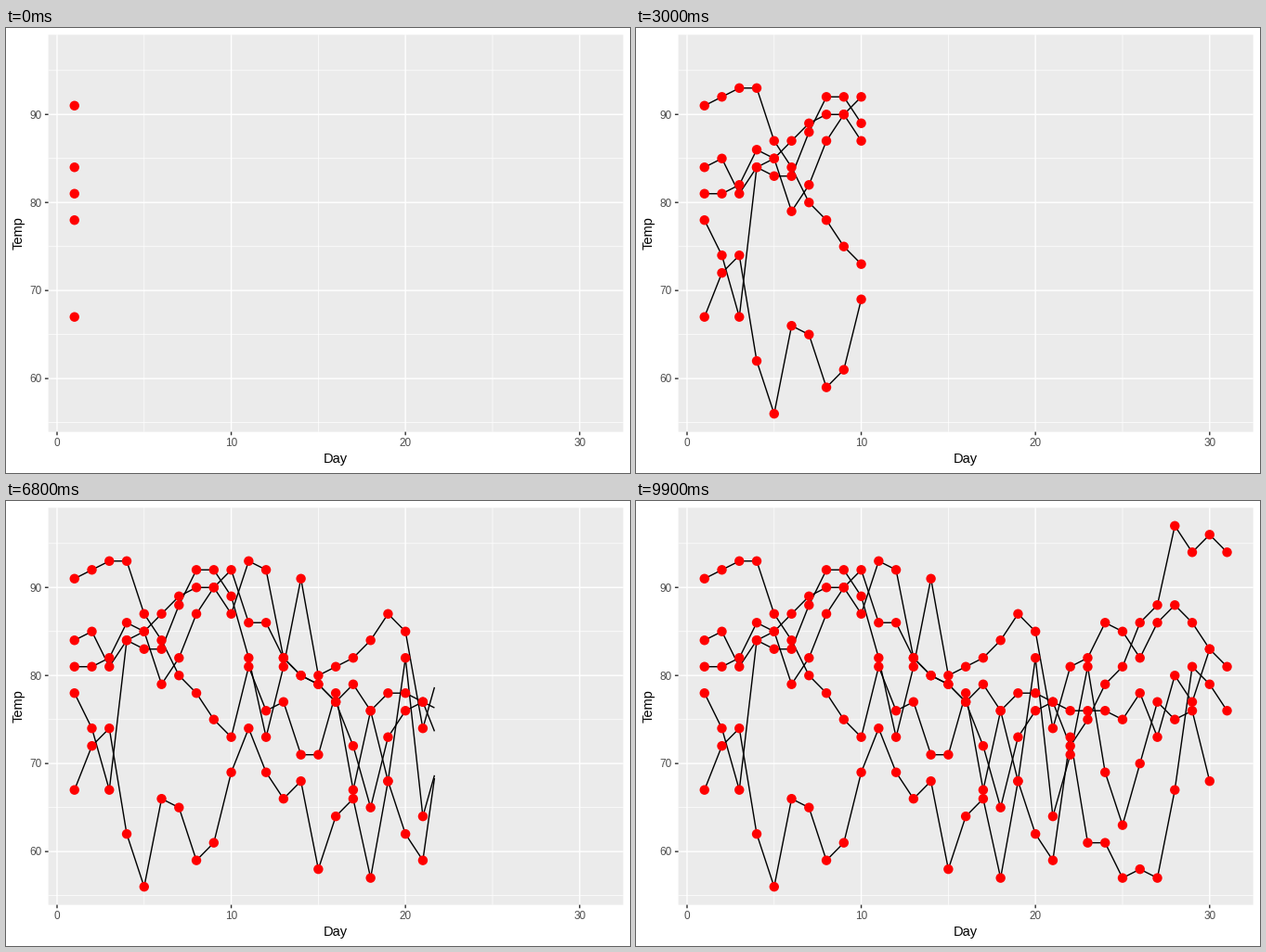
A matplotlib script that plays this animation: 672x480 px, repeating every 10 s.

```python
import matplotlib.pyplot as plt
import numpy as np
from matplotlib.animation import FuncAnimation
from matplotlib.patches import Rectangle

W, H, DPI = 672, 480, 96
FRAMES = 100
PT = 72 / DPI  # points per pixel
LEFT, RIGHT, TOP, BOTTOM = 45.6, 664.67, 7.33, 435.6
TICK = 3.67
THICK, THIN = 1.42, 0.71
DOT = 10.4

plt.rcParams["path.snap"] = False
plt.rcParams["font.family"] = "Liberation Sans"

# Daily temperatures of the airquality data set
may = [67, 72, 74, 62, 56, 66, 65, 59, 61, 69, 74, 69, 66, 68, 58, 64,
       66, 57, 68, 62, 59, 73, 61, 61, 57, 58, 57, 67, 81, 79, 76]
june = [78, 74, 67, 84, 85, 79, 82, 87, 90, 87, 93, 92, 82, 80, 79, 77,
        72, 65, 73, 76, 77, 76, 76, 76, 75, 78, 73, 80, 77, 83]
july = [84, 85, 81, 84, 83, 83, 88, 92, 92, 89, 82, 73, 81, 91, 80, 81,
        82, 84, 87, 85, 74, 81, 82, 86, 85, 82, 86, 88, 86, 83, 81]
august = [81, 81, 82, 86, 85, 87, 89, 90, 90, 92, 86, 86, 82, 80, 79, 77,
          79, 76, 78, 78, 77, 72, 75, 79, 81, 86, 88, 97, 94, 96, 94]
september = [91, 92, 93, 93, 87, 84, 80, 78, 75, 73, 81, 76, 77, 71, 71, 78,
             67, 76, 68, 82, 64, 71, 81, 69, 63, 70, 77, 75, 76, 68]
months = [np.array(m) for m in (may, june, july, august, september)]

days = np.arange(1, 32)
key_frames = np.round((days - 1) * (FRAMES - 1) / 30)


def px(day):
    return LEFT + (day + 0.5) * (RIGHT - LEFT) / 33


def py(temp):
    return BOTTOM - (temp - 53.95) * (BOTTOM - TOP) / 45.1


fig = plt.figure(figsize=(W / DPI, H / DPI), dpi=DPI, facecolor="white")
ax = fig.add_axes([0, 0, 1, 1])
ax.axis("off")


def segment(xs, ys, color, width, z):
    ax.plot(xs, ys, color=color, lw=width * PT, solid_capstyle="butt", zorder=z)


def label(x, y, text, size=8.8, color="#4d4d4d", **kw):
    ax.text(x, y, text, size=size, color=color, va="baseline", **kw)


ax.add_patch(Rectangle((LEFT, TOP), RIGHT - LEFT, BOTTOM - TOP,
                       fc="#ebebeb", lw=0, zorder=0))

for day in (5, 15, 25):
    segment([px(day)] * 2, [TOP, BOTTOM], "white", THIN, 1)
for temp in range(55, 100, 10):
    segment([LEFT, RIGHT], [py(temp)] * 2, "white", THIN, 1)

for day in (0, 10, 20, 30):
    x = px(day)
    segment([x, x], [TOP, BOTTOM], "white", THICK, 2)
    segment([x, x], [BOTTOM, BOTTOM + TICK], "#333333", THICK, 2)
    label(x, 451, str(day), ha="center")
for temp in (60, 70, 80, 90):
    y = py(temp)
    segment([LEFT, RIGHT], [y, y], "white", THICK, 2)
    segment([LEFT - TICK, LEFT], [y, y], "#333333", THICK, 2)
    label(39, y + 4.3, str(temp), ha="right")

label((LEFT + RIGHT) / 2, 469, "Day", 11, "black", ha="center")
ax.text(18, (TOP + BOTTOM) / 2, "Temp", size=11, color="black", rotation=90,
        rotation_mode="anchor", ha="center", va="baseline")

lines = [ax.plot([], [], color="black", lw=THICK * PT, solid_capstyle="butt",
                 solid_joinstyle="round", zorder=3)[0] for _ in months]

dot_days = np.concatenate([days[:len(m)] for m in months])
dot_temps = np.concatenate(months)
dot_area = (DOT * PT) ** 2
dots = ax.scatter(px(dot_days), py(dot_temps), s=np.full(len(dot_days), dot_area),
                  color="red", linewidths=0, zorder=4)

ax.set_xlim(0, W)
ax.set_ylim(H, 0)


def update(i):
    now = np.interp(i, key_frames, days)
    for line, temps in zip(lines, months):
        d = days[:len(temps)]
        seen = d <= now
        head = min(now, d[-1])
        xs = np.append(d[seen], head)
        ys = np.append(temps[seen], np.interp(head, d, temps))
        line.set_data(px(xs), py(ys))
    dots.set_sizes(np.where(dot_days <= now, dot_area, 0), DPI)
    return [*lines, dots]


anim = FuncAnimation(fig, update, frames=FRAMES, interval=100, repeat=True,
                     repeat_delay=0)
plt.show()
```
